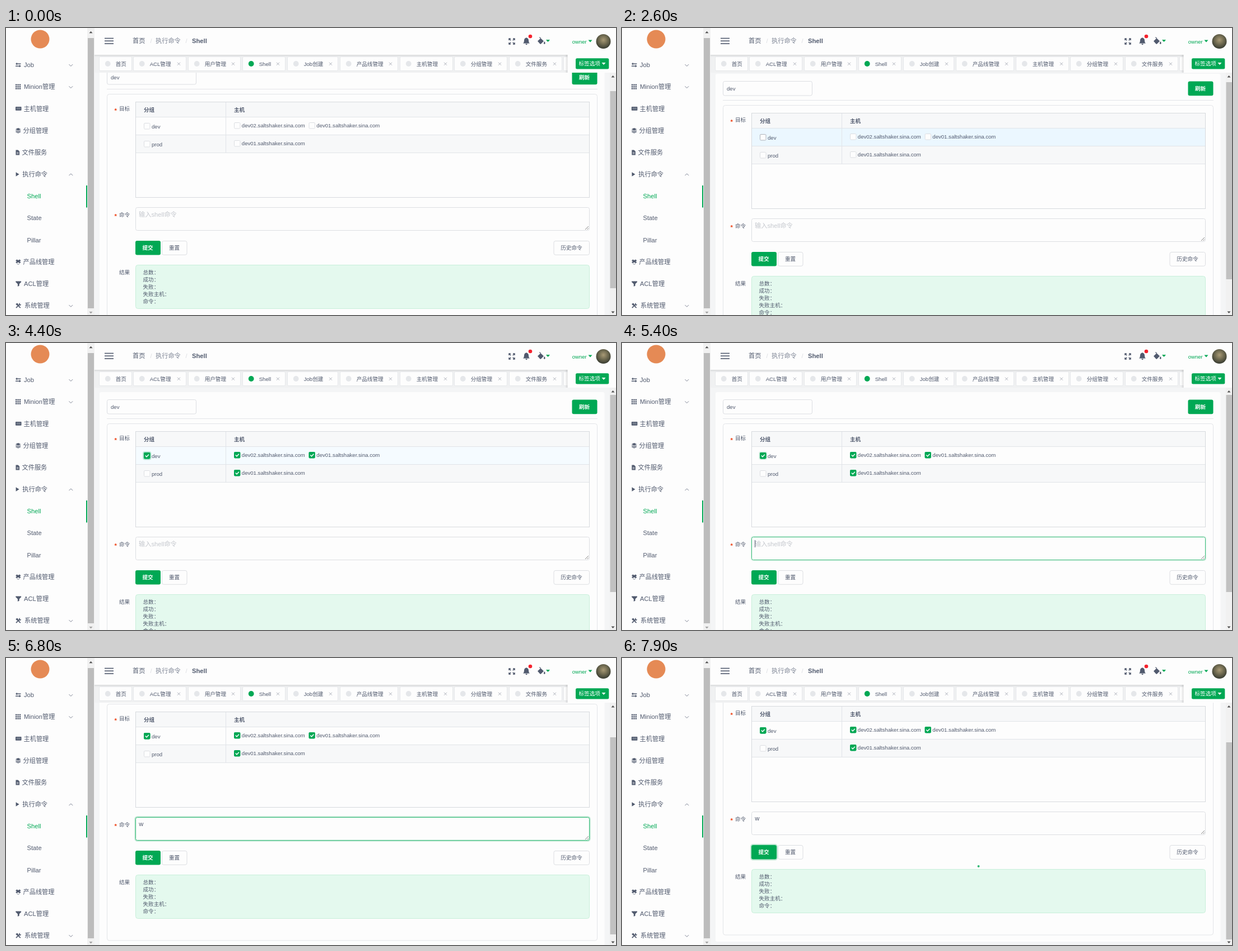
Recreate the animation shown at these times as an HTML page. Size 1089 px wide and 514 px high, loop 8 s.

```html
<!DOCTYPE html>
<html lang="zh-CN">
<head>
<meta charset="utf-8">
<title>Shell</title>
<style>
html, body { margin: 0; width: 100%; height: 100%; overflow: hidden; background: #fdfdfd; }
svg { display: block; width: 1089px; height: 514px; }
text { font-family: "Liberation Sans", "Noto Sans CJK SC", "Noto Sans CJK", sans-serif; white-space: pre; }
</style>
</head>
<body>
<svg id="stage" viewBox="0 0 1089 514">
  <defs>
    <clipPath id="view"><rect x="158" y="80" width="920" height="434"/></clipPath>
    <linearGradient id="fade" x1="0" x2="0" y1="0" y2="1">
      <stop offset="0" stop-color="#000" stop-opacity=".1"/><stop offset="1" stop-color="#000" stop-opacity="0"/>
    </linearGradient>
    <linearGradient id="side" x1="1" x2="0" y1="0" y2="0">
      <stop offset="0" stop-color="#000" stop-opacity=".13"/><stop offset="1" stop-color="#000" stop-opacity="0"/>
    </linearGradient>
    <radialGradient id="photo" cx=".5" cy=".4" r=".62">
      <stop offset="0" stop-color="#a89a76"/><stop offset=".5" stop-color="#6f6a50"/><stop offset="1" stop-color="#34382f"/>
    </radialGradient>
  </defs>
</svg>
<script>
const LOOP = 8000;
const GREEN = '#00a854', INK = '#515a6e', LINE = '#dcdee2', WHITE = '#fdfdfd', PALE = '#f7f8f9';
const stage = document.getElementById('stage');
let layer = stage;

function add(tag, attrs, parent = layer) {
  const el = document.createElementNS('http://www.w3.org/2000/svg', tag);
  for (const k in attrs) el.setAttribute(k, attrs[k]);
  return parent.appendChild(el);
}
const group = (attrs = {}) => add('g', attrs);
function inside(g, draw) {
  const before = layer;
  layer = g;
  draw();
  layer = before;
  return g;
}
const box = (x, y, width, height, fill, stroke = 'none', rx = 0) =>
  add('rect', { x, y, width, height, fill, stroke, rx });
const dot = (cx, cy, r, fill) => add('circle', { cx, cy, r, fill });
const fillPath = (d, fill = INK) => add('path', { d, fill });
const line = (d, stroke = INK, width = 1) =>
  add('path', { d, stroke, fill: 'none', 'stroke-width': width });
function text(x, y, str, size = 9.6, fill = INK, weight = 400) {
  const el = add('text', { x, y, fill, 'font-size': size, 'font-weight': weight });
  el.textContent = str;
  return el;
}
const caretDown = (x, y, fill) => fillPath(`M${x - 3.5} ${y - 2}h7l-3.5 4z`, fill);

// Holds each value from its time until the next one.
function track(el, prop, steps) {
  const frames = steps.map(([t, v]) => ({ offset: t / LOOP, [prop]: v, easing: 'steps(1, end)' }));
  frames.push({ offset: 1, [prop]: steps[steps.length - 1][1] });
  el.animate(frames, { duration: LOOP, iterations: Infinity });
}

// ---- page ----
box(158, 48, 931, 466, '#f4f5f6');
const page = inside(group({ 'clip-path': 'url(#view)' }), () => {});
const body = inside(page, () => {}) && add('g', {}, page);

function checkbox(x, y) {
  const frame = box(x + .5, y + .5, 10.5, 10.5, WHITE, LINE, 1.5);
  const tick = inside(group({ opacity: 0 }), () => {
    box(x, y, 11.4, 11.4, GREEN, 'none', 1.8);
    line(`M${x + 2.8} ${y + 5.6}l2.2 2.3l3.8 -4.2`, '#fff', 1.5);
  });
  return { frame, tick };
}
function label(y, str, required) {
  if (required) text(193.5, y + 3.5, '*', 11.2, '#ed4014', 700);
  text(202, y, str);
}
function button(x, y, w, str, primary, tx) {
  if (primary) box(x, y, w, 25.6, GREEN, 'none', 3);
  else box(x + .5, y + .5, w - 1, 24.8, WHITE, LINE, 3);
  text(tx, y + 16.4, str, 9.6, primary ? '#fff' : INK, primary ? 700 : 400);
}

const ui = {};
inside(body, () => {
  box(167, 62, 901.5, 492, WHITE, 'none', 3);
  box(180.5, 75.5, 159, 25.5, WHITE, LINE, 3);
  text(187, 92, 'dev');
  button(1010.5, 75.6, 45, '刷新', true, 1023);
  line('M180 109.5H1056', '#e3e5e8');
  box(180.5, 118.5, 875, 423.5, 'none', '#e3e5e8', 4);

  label(148, '目标', true);
  box(231.5, 132.5, 810, 171, WHITE, '#d7dade');
  box(232, 133, 809, 26.5, PALE);
  ui.row = box(232, 160, 809, 31.5, WHITE);
  box(232, 192, 809, 31.5, PALE);
  line('M232 159.5H1041M232 191.5H1041M232 223.5H1041M392.5 133V223', '#e1e4e8');
  text(246, 149.7, '分组', 9.6, INK, 700);
  text(407, 149.7, '主机', 9.6, INK, 700);
  ui.ring = box(245, 169, 13.4, 13.4, 'none', GREEN, 3);
  ui.ring.setAttribute('stroke-width', 2);
  ui.dev = checkbox(246, 170);
  text(260, 179.5, 'dev');
  checkbox(246, 202);
  text(260, 211.5, 'prod');
  ui.hosts = [[407, 169, 'dev02'], [540.5, 169, 'dev01'], [407, 201, 'dev01']].map(([x, y, name]) => {
    text(x + 13.8, y + 9.3, name + '.saltshaker.sina.com');
    return checkbox(x, y);
  });

  label(337.5, '命令', true);
  ui.glow = box(230.5, 320.5, 812, 43, 'none', GREEN, 4);
  ui.glow.setAttribute('stroke-width', 2.4);
  ui.area = box(231.5, 321.5, 810, 41, WHITE, LINE, 3);
  ui.hint = text(237, 337.8, '输入shell命令', 11.2, '#c5c8ce');
  ui.typed = text(237.3, 337.3, 'w', 11.2);
  ui.caret = box(237, 327, 1, 13, INK);
  line('M1034 361l6 -6M1037.5 361l2.5 -2.5', '#777', .9);

  ui.press = box(230, 380, 47, 27.6, 'none', GREEN, 4);
  ui.press.setAttribute('stroke-width', 2);
  button(231, 381, 45, '提交', true, 243.5);
  button(278, 381, 45.5, '重置', false, 291);
  button(977.5, 381, 64.5, '历史命令', false, 990.3);

  label(440.5, '结果', false);
  box(231.5, 424.5, 810, 78, '#e4f9ee', '#c8efda', 4);
  ['总数', '成功', '失败', '失败主机', '命令'].forEach((s, i) => text(244.5, 441.3 + i * 12.8, s + '：'));
  ui.spin = dot(636.5, 419, 0, GREEN);
});

// ---- right scrollbar ----
box(1078, 80, 11, 434, '#f1f1f1');
ui.thumb = box(1078.5, 113, 10.5, 353, '#c1c1c1');
fillPath('M1080.5 88.5h6l-3 -3.6z', '#505050');
fillPath('M1080.5 507.5h6l-3 3.6z', '#505050');

// ---- header ----
box(158, 0, 931, 48, WHITE);
[18.5, 23.2, 28].forEach(y => box(176, y - .8, 16, 1.6, INK));
text(226, 26.5, '首页', 11.2);
text(257.5, 26.5, '/', 11.2, LINE);
text(267, 26.5, '执行命令', 11.2, '#7d8494');
text(320.5, 26.5, '/', 11.2, LINE);
text(332, 26.5, 'Shell', 11.2, INK, 700);
line('M898 22v-3h3M905 19h3v3M908 26v3h-3M901 29h-3v-3M898.5 19.5l9 9M907.5 19.5l-9 9', INK, 1.5);
box(901, 22, 4, 4, WHITE);
fillPath('M923 27.5q2 -1.5 2 -5q0 -4.5 4 -5.3q4 .8 4 5.3q0 3.5 2 5zM927.3 28.3h3.6q-.4 2 -1.8 2t-1.8 -2z');
dot(936, 15, 3.3, '#f5222d');
fillPath('M949 23.5l5.5 -5.3l5.5 5.3l-5 5q-.8 .7 -1.6 0zM961.3 24q2.8 4 0 5q-2.8 -1 0 -5z');
line('M954.5 18.5l-2 -2', INK, 1.2);
caretDown(967.5, 23, GREEN);
text(1010.7, 27.5, 'owner', 9.6, GREEN);
caretDown(1043, 23.5, GREEN);
dot(1066.5, 24, 13, 'url(#photo)');

// ---- tabs ----
box(158, 48, 931, 32, '#f0f1f2');
box(158, 48, 931, 4, 'url(#fade)');
[
  ['首页', 167, 58], ['ACL管理', 228, 94], ['用户管理', 326, 93], ['Shell', 423, 76], ['Job创建', 503, 90],
  ['产品线管理', 597, 103], ['主机管理', 704, 94], ['分组管理', 801, 94], ['文件服务', 899, 94], ['', 996, 40]
].forEach(([name, x, w], i) => {
  box(x - .5, 51.5, w, 25, WHITE, '#e6e8eb', 2);
  if (!name) return;
  dot(x + 14.7, 64, 4.9, name === 'Shell' ? GREEN : '#e5e7ea');
  text(x + 28.7, 67.6, name);
  if (i) line(`M${x + w - 16} 61.7l5 5m0 -5l-5 5`, '#a3a8b2', .9);
});
box(998, 48, 5, 32, 'url(#side)');
box(1002.5, 48, 86.5, 32, WHITE);
box(1017, 54.3, 59.3, 19.2, GREEN, 'none', 2.5);
text(1022.5, 67.4, '标签选项', 9.6, '#fff', 500);
caretDown(1067, 64, '#fff');

// ---- sidebar ----
box(0, 0, 145, 514, WHITE);
dot(61, 20, 16.5, '#e58a55');
const rowY = i => 66.2 + i * 39.18;
[
  ['Job', 32], ['Minion管理', 32], ['主机管理', 31.5], ['分组管理', 30.5], ['文件服务', 28.5], ['执行命令', 29.3],
  ['Shell', 37.5], ['State', 37.5], ['Pillar', 37.5], ['产品线管理', 30.5], ['ACL管理', 32], ['系统管理', 33]
].forEach(([name, x], i) => text(x, rowY(i) + 4, name, 11.2, name === 'Shell' ? GREEN : INK));
for (const i of [0, 1, 5, 11]) {
  const d = i === 5 ? -1 : 1;
  line(`M112.5 ${rowY(i) - 1.6 * d + .5}l3.3 ${3.3 * d}l3.3 ${-3.3 * d}`, '#7d8494', 1);
}
function icon(i, draw) {
  inside(group({ transform: `translate(17 ${rowY(i) - 5})` }), draw);
}
icon(0, () => {
  line('M2.5 3H9.5M0 7H7', INK, 1.4);
  fillPath('M3 .6v4.8L0 3zM6.8 4.6v4.8L9.8 7z');
});
icon(1, () => {
  for (let k = 0; k < 9; k++) box(k % 3 * 3.4, .2 + Math.floor(k / 3) * 3.4, 2.4, 2.4, INK);
});
icon(2, () => {
  box(0, 1.5, 10.5, 6.8, INK, 'none', .8);
  line('M1.5 3.6H9M1.5 5.4H9', '#aab0ba', .7);
});
icon(3, () => {
  fillPath('M4.7 .3l4.7 2.3l-4.7 2.3l-4.7 -2.3z');
  line('M.4 4.8l4.3 2.1l4.3 -2.1M.4 7l4.3 2.1l4.3 -2.1', INK, 1.2);
});
icon(4, () => {
  fillPath('M.5 .5h4l2.6 2.6v6.4h-6.6z');
  line('M2 5h3.6M2 7h3.6', WHITE, .8);
});
icon(5, () => fillPath('M.6 1.2l6 3.7l-6 3.7z'));
icon(9, () => fillPath('M2.5 .8l2.3 1.5l2.3 -1.5l2.5 1.9l-2.1 1.6l2.1 1.6l-2.4 1.5l-2.4 -1.8l-2.4 1.8l-2.3 -1.5l2.1 -1.6l-2.1 -1.6zM2.4 7.6l2.4 1.7l2.4 -1.7v.9l-2.4 1.5l-2.4 -1.5z'));
icon(10, () => fillPath('M.3 .5h9.8v1.5l-3.4 3.6v3l-2.8 1.4v-4.4l-3.6 -3.6z'));
icon(11, () => {
  line('M1 9l6.5 -6.5M3 3l5.7 6', INK, 1.7);
  fillPath('M.3 2.5l2.5 -2.3l2.4 2.3l-2.4 2.3zM6.4 .6l2 0l-1 1.5l1 1l1.4 -.8q.2 2.6 -2 2.6q-2.2 -.6 -1.4 -4.3z');
});
box(143, 282, 2, 39.5, GREEN);
box(145, 0, 13, 514, '#f1f1f1');
box(146, 18, 11, 484, '#bcbcbc');
fillPath('M148.5 9.3h6l-3 -3.6z', '#505050');
fillPath('M148.5 508h6l-3 3.6z', '#a3a3a3');

// ---- timeline ----
const slide = steps => steps.map(([t, y]) => [t, `translate(0px, ${y}px)`]);
track(body, 'transform', slide([[0, 0], [2600, 20], [2700, 26], [6800, -36], [6900, -46]]));
track(ui.thumb, 'transform', slide([[0, 0], [2600, -16], [2700, -20], [6800, 29], [6900, 38]]));

track(ui.row, 'fill', [[0, WHITE], [800, '#f4fafe'], [900, '#ebf7ff'], [4400, '#f5fbff'], [4500, WHITE]]);
track(ui.dev.frame, 'stroke', [[0, LINE], [1600, '#aeb3ba'], [3800, GREEN]]);
track(ui.dev.tick, 'opacity', [[0, 0], [3800, 1]]);
track(ui.ring, 'opacity', [[0, 0], [3800, .25], [5400, .12], [5500, 0]]);
for (const h of ui.hosts) track(h.tick, 'opacity', [[0, 0], [4000, .5], [4100, 1]]);

track(ui.area, 'stroke', [[0, LINE], [5000, '#a3d3bb'], [5100, '#66c596'], [5200, '#33b976'],
  [7400, '#6fc79a'], [7500, '#b4d8c6'], [7600, LINE]]);
track(ui.glow, 'opacity', [[0, 0], [5400, .08], [5500, .18], [5600, .25], [7400, .16], [7500, .07], [7600, 0]]);
track(ui.hint, 'opacity', [[0, 1], [6200, 0]]);
track(ui.typed, 'opacity', [[0, 0], [6200, 1]]);
track(ui.caret, 'opacity', [[0, 0], [5400, 1], [5900, 0], [6200, 1], [6700, 0], [7200, 1], [7400, 0]]);
track(ui.caret, 'transform', [[0, 'translate(0px, 0px)'], [6200, 'translate(8.5px, 0px)']]);
track(ui.press, 'opacity', [[0, 0], [7300, .1], [7400, .2], [7500, .25]]);
track(ui.spin, 'r', [[0, '0px'], [7700, '.3px'], [7800, '.9px'], [7900, '2px']]);
track(ui.spin, 'opacity', [[0, 1], [7700, .98], [7800, .92], [7900, .8]]);
</script>
</body>
</html>
```
